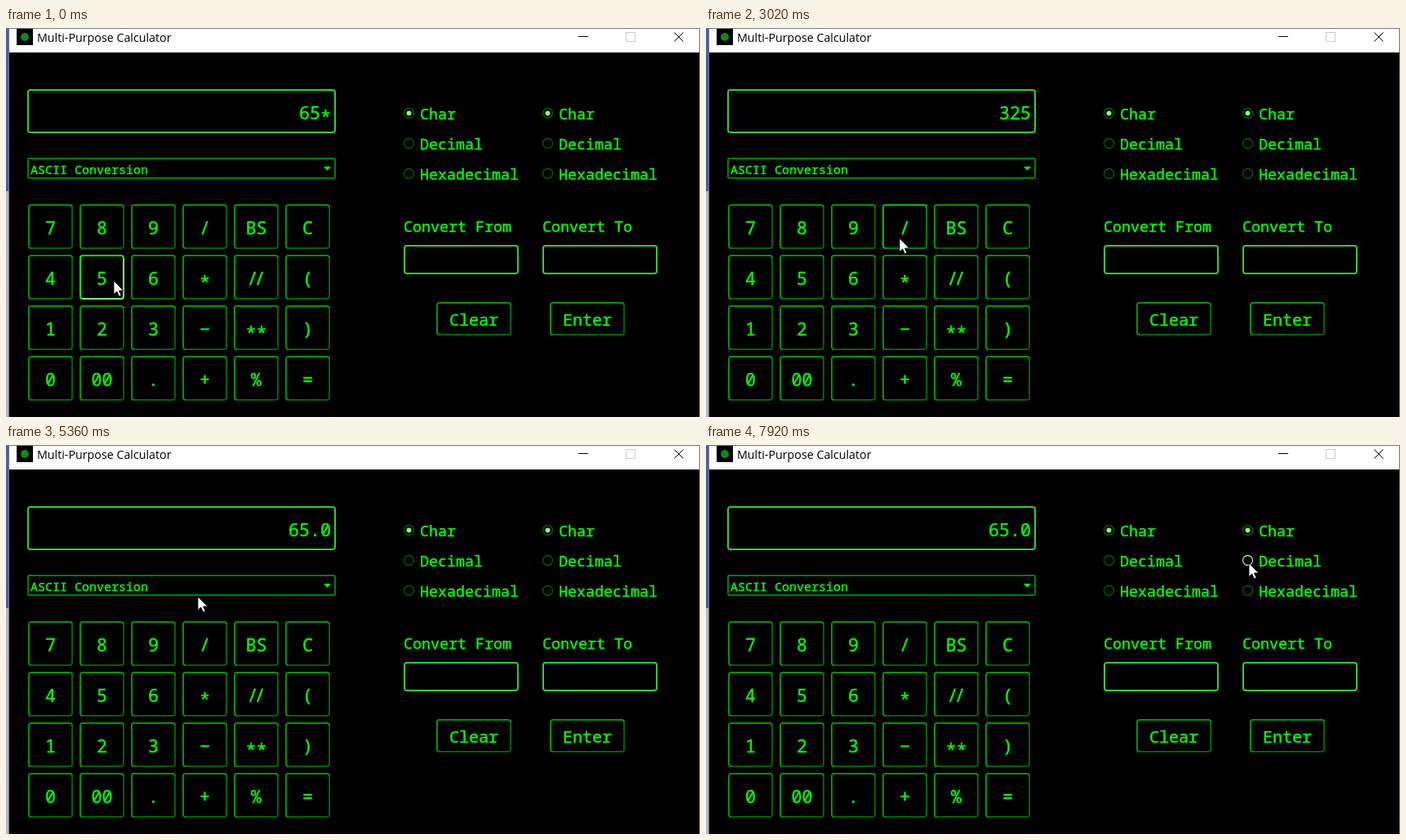
An HTML page that plays this animation: 850x477 px, repeating every 8 s.

```html
<!DOCTYPE html>
<html lang="en">
<head>
<meta charset="utf-8">
<title>Multi-Purpose Calculator</title>
<style>
  html, body { margin: 0; width: 100%; height: 100%; overflow: hidden; background: #000; }
  svg { display: block; width: 850px; height: 477px; }
  text {
    font-family: "Noto Sans Mono", "DejaVu Sans Mono", monospace; white-space: pre;
    color: #0f0; fill: currentColor; stroke: currentColor; stroke-width: .45;
  }
  .title { font-family: "Open Sans", "Noto Sans", sans-serif; font-size: 14.25px; color: #000; stroke: none; }
  .big { font-size: 21.67px; }
  .mid { font-size: 20px; }
  .label { font-size: 18.33px; }
  .small { font-size: 15px; }
  .center { text-anchor: middle; }
  .right { text-anchor: end; }
  .tight { letter-spacing: -4px; }
  .dark { color: #000; }
  .box { fill: none; stroke-width: 2; }
  .field { stroke: #32cd32; }
  .combo { stroke: #008000; }
  .lime, .open .combo, .hover .combo { stroke: #0f0; }
  .lit { stroke: #009600; }
  .shade { stroke: #006400; }
  .hover .lit { stroke: #00c000; }
  .hover .shade { stroke: #008000; }
  .press .lit { stroke: #0f0; }
  .press .shade { stroke: #7fff7f; }
  .ring { fill: none; stroke: #006400; stroke-width: 1.3; }
  .hover .ring { stroke: #90ee90; }
  .dot { fill: #90ee90; }
</style>
</head>
<body>
<svg id="stage" viewBox="0 0 850 477"></svg>
<script>
const stage = document.getElementById('stage');
const LOOP = 8000, TICK = 130, PRESS = 150;

function add(parent, tag, attrs) {
  const el = document.createElementNS('http://www.w3.org/2000/svg', tag);
  for (const k in attrs) el.setAttribute(k, attrs[k]);
  parent.appendChild(el);
  return el;
}
const rect = (p, x, y, width, height, fill) => add(p, 'rect', { x, y, width, height, fill });
const outline = (p, x, y, w, h, cls, rx = 3) =>
  add(p, 'rect', { x: x + 1, y: y + 1, width: w - 2, height: h - 2, rx, class: 'box ' + cls });

// Asterisks sit on the maths axis, so they are lowered by a few pixels.
function setText(el, str) {
  el.textContent = '';
  let low = 0;
  for (const part of str.match(/\*+|[^*]+/g)) {
    const want = part[0] === '*' ? 5 : 0;
    add(el, 'tspan', { dy: want - low }).textContent = part;
    low = want;
  }
}
function text(p, x, y, str, cls) {
  const el = add(p, 'text', { x, y, class: cls });
  setText(el, str);
  return el;
}

const widgets = [];
function widget(x, y, w, h) {
  const el = add(stage, 'g', {});
  widgets.push({ x, y, w, h, el });
  return el;
}

// Two-tone border: lit top and left, shaded bottom and right.
function button(name, x, y, w, h, base, cls) {
  const g = widget(x, y, w, h);
  const l = x + 1, t = y + 1, r = x + w - 1, b = y + h - 1;
  add(g, 'path', { class: 'box shade', d: `M${r} ${t + 3}V${b - 3}Q${r} ${b} ${r - 3} ${b}H${l + 3}` });
  add(g, 'path', { class: 'box lit', d: `M${l + 3} ${b}Q${l} ${b} ${l} ${b - 3}V${t + 3}Q${l} ${t} ${l + 3} ${t}H${r - 3}Q${r} ${t} ${r} ${t + 3}` });
  const tight = name === '//';
  text(g, x + w / 2 - (tight ? 2 : 0), y + base, name, cls + ' center' + (tight ? ' tight' : ''));
}

// Window chrome
rect(stage, 0, 0, 3, 200, '#4a60a4');
rect(stage, 0, 200, 3, 277, '#b4b8c4');
rect(stage, 3, 0, 1, 477, '#777');
rect(stage, 4, 0, 846, 30, '#fff');
rect(stage, 0, 0, 850, 1, '#777');
rect(stage, 849, 0, 1, 477, '#777');
rect(stage, 13, 1, 20, 20, '#000');
add(stage, 'circle', { cx: 23, cy: 11, r: 5, fill: '#0a8a1e' });
text(stage, 38, 17, 'Multi-Purpose Calculator', 'title');
rect(stage, 701, 10, 12, 1, '#000');
add(stage, 'rect', { x: 759.5, y: 5.5, width: 11, height: 11, fill: 'none', stroke: '#ccc' });
add(stage, 'path', { d: 'M818.5 5.5l11 11m0-11l-11 11', stroke: '#000' });

// Calculator
outline(stage, 26, 75, 378, 54, 'field');
const display = text(stage, 398, 112, '0', 'big right');

const combo = widget(26, 159, 378, 26);
outline(combo, 26, 159, 378, 26, 'combo', 1);
text(combo, 30, 178.5, 'ASCII Conversion', 'small');
const arrow = add(combo, 'path', { d: 'M389 170h9l-4.5 4.8z' });

['7 8 9 / BS C', '4 5 6 * // (', '1 2 3 − ** )', '0 00 . + % ='].forEach((row, j) =>
  row.split(' ').forEach((key, i) => button(key, 27 + 63 * i, 216 + 62 * j, 55, 55, 37, 'big')));

// Converter
['Convert From', 'Convert To'].forEach((name, col) => {
  const x = 487 + 170 * col;
  ['Char', 'Decimal', 'Hexadecimal'].forEach((kind, i) => {
    const cx = x + 6.5, cy = 104.5 + 37 * i;
    const g = widget(x, cy - 11, 141, 22);
    add(g, 'circle', { cx, cy, r: 6, class: 'ring' });
    if (!i) add(g, 'circle', { cx, cy, r: 3, class: 'dot' });
    text(g, x + 20, cy + 7.5, kind, 'label');
  });
  text(stage, x, 250, name, 'label');
  outline(stage, x, 266, 141, 36, 'field');
});
button('Clear', 527, 336, 92, 41, 29, 'mid');
button('Enter', 666, 336, 92, 41, 29, 'mid');

// Drop-down list
const ROW = 21, LIST_TOP = 186;
const list = add(stage, 'g', {});
rect(list, 26, 185, 378, 128, '#000');
const mark = rect(list, 28, LIST_TOP, 374, 20, '#0f0');
outline(list, 26, 185, 378, 128, 'lime', 0);
const items = ['ASCII', 'Base', 'Prime Number Generator/Validator', 'Metric', 'Temperature', 'Birthday']
  .map((s, i) => text(list, 31, LIST_TOP + 16 + ROW * i, s.includes('/') ? s : s + ' Conversion', 'small'));

const cursor = add(stage, 'path', {
  d: 'M0 0V16.5L3.8 13L6.4 19L9 17.9L6.5 12H11.8Z', fill: '#fff', stroke: '#000', 'stroke-width': .8
});

// Pointer moves: start, end, x, y
const home = [132, 310];
const moves = [
  [150, 680, 407, 446], [680, 820, 383, 438],     // equals
  [1240, 1500, 200, 310], [1500, 1690, 285, 307], // wander back
  [1910, 2470, 298, 334], [2470, 2990, 237, 258], // divide
  [3320, 3640, 117, 309],                         // five
  [3950, 4340, 385, 452],                         // equals
  [4580, 4900, 300, 207], [5090, 5490, 200, 174], // combo box
  [5630, 5870, 185, 297], [5870, 6100, 177, 204], // browse the list
  [6240, 6410, 535, 150], [6500, 7000, 489, 145], // left radios
  [7280, 7660, 691, 130], [7660, 7800, 665, 145]  // right radios
];
// Each click ends with a new readout.
const clicks = [[150, '65*5'], [1236, '325'], [3320, '325/'], [3830, '325/5'], [4580, '65.0']];

const ease = k => k * k * (3 - 2 * k);

function pointer(t) {
  let [x, y] = home;
  for (const [a, b, u, v] of moves) {
    const k = ease(Math.min(1, Math.max(0, (t - a) / (b - a))));
    x += (u - x) * k;
    y += (v - y) * k;
  }
  return [Math.round(x), Math.round(y)];
}

function render(t) {
  const [x, y] = pointer(Math.floor(t / TICK) * TICK);
  const open = t >= 5630 && t < 6260;
  const down = clicks.some(([up]) => t < up && t >= up - PRESS);
  const done = clicks.filter(([up]) => t >= up).pop();
  setText(display, done ? done[1] : '65*');
  cursor.setAttribute('transform', `translate(${x} ${y})`);

  for (const w of widgets) {
    const over = !open && x >= w.x && x < w.x + w.w && y >= w.y && y < w.y + w.h;
    w.el.setAttribute('class', over ? (down ? 'press' : 'hover') : '');
  }
  if (open) combo.setAttribute('class', 'open');
  arrow.setAttribute('fill', open ? '#32cd32' : '#0f0');

  list.setAttribute('visibility', open ? 'visible' : 'hidden');
  const row = Math.max(0, Math.min(items.length - 1, Math.floor((y - LIST_TOP) / ROW)));
  mark.setAttribute('y', LIST_TOP + ROW * row);
  items.forEach((el, i) => el.setAttribute('class', i === row ? 'small dark' : 'small'));
}

const start = performance.now();
function frame() {
  render((performance.now() - start) % LOOP);
  requestAnimationFrame(frame);
}
frame();
</script>
</body>
</html>
```
